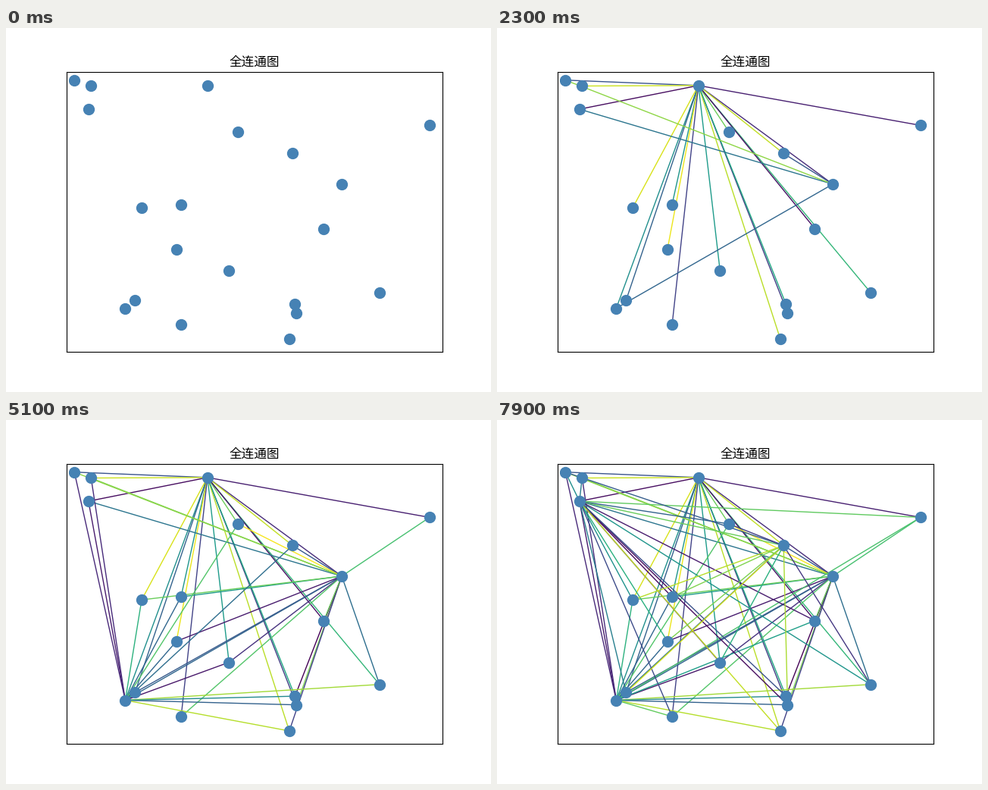
Animation, 640 px wide and 480 px high, one loop 8 s. Source, as a matplotlib script:

```python
from itertools import combinations

import matplotlib.pyplot as plt
import numpy as np
from matplotlib.animation import FuncAnimation
from matplotlib.collections import LineCollection

NODES = 20
FRAMES = 80
INTERVAL = 100

plt.rcParams["font.family"] = ["Noto Sans CJK JP"]

rng = np.random.RandomState(42)
pos = rng.rand(NODES, 2)
pairs = list(combinations(range(NODES), 2))
colors = plt.cm.viridis(rng.rand(len(pairs)))
segments = [pos[list(pair)] for pair in pairs]

fig, ax = plt.subplots(figsize=(6.4, 4.8), dpi=100)
ax.set(xlim=(0, 1), ylim=(0, 1), xticks=[], yticks=[])
ax.set_title("全连通图", fontsize=12)

edges = LineCollection([], linewidths=1, zorder=1)
ax.add_collection(edges, autolim=False)
ax.scatter(*pos.T, s=100, c="steelblue", zorder=2)


def update(count):
    """Show the first `count` edges of the complete graph."""
    edges.set_segments(segments[:count])
    edges.set_color(colors[:count])
    return (edges,)


anim = FuncAnimation(fig, update, frames=FRAMES, interval=INTERVAL,
                     repeat=True, repeat_delay=0)
plt.show()
```
